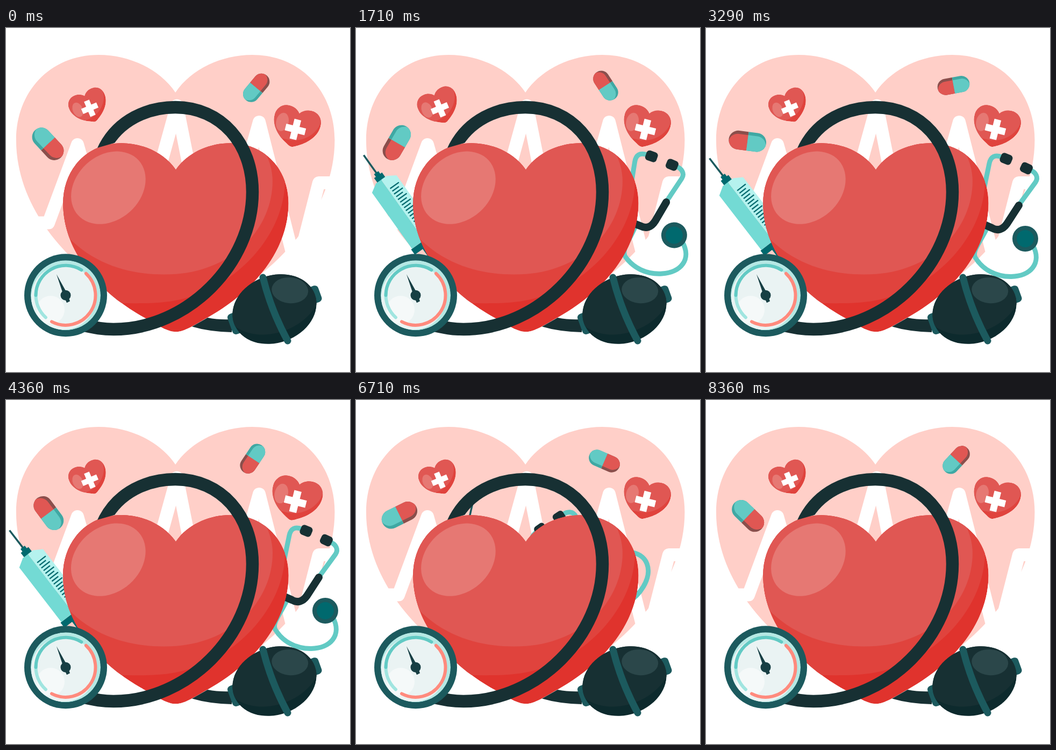
An HTML page that plays this animation: 640x640 px, repeating every 8430 ms.

```html
<!DOCTYPE html>
<html lang="en">
<head>
<meta charset="utf-8">
<title>Blood pressure</title>
<style>
  html, body { margin: 0; height: 100%; overflow: hidden; background: #fff; }
  svg { display: block; width: 100vw; height: 100vh; }
  .line { fill: none; stroke-linejoin: round; stroke-linecap: round; }
</style>
</head>
<body>
<svg viewBox="0 0 640 640">
  <defs>
    <path id="heart" d="M0-126C-21-157-61-175.5-101-175.5C-166-175.5-209.7-126-209.7-63.5C-209.7 30-136 105-66 145C-31 165-16 175.5 0 175.5C16 175.5 31 165 66 145C136 105 209.7 30 209.7-63.5C209.7-126 166-175.5 101-175.5C61-175.5 21-157 0-126Z"/>
    <path id="body" d="M-220 118C-150 120-80 125-30 121C100 112 203 0 203-105C203-135 190-158 175-185H-220Z"/>
    <clipPath id="inHeart"><use href="#heart"/></clipPath>
    <clipPath id="inPill"><rect x="-35" y="-17.5" width="70" height="35" rx="17.5"/></clipPath>
    <clipPath id="inBulb"><ellipse rx="80" ry="62.5"/></clipPath>
    <clipPath id="inDial"><circle r="65"/></clipPath>
    <clipPath id="hoseCut"><path d="M0 0H640V640H0V400H215V210L0 272Z"/></clipPath>

    <g id="smallHeart">
      <g clip-path="url(#inHeart)">
        <use href="#heart" fill="#e0433d"/>
        <use href="#body" fill="#e05753"/>
        <ellipse cx="-128" cy="-18" rx="55" ry="82" fill="#e67873"/>
      </g>
      <path d="M0-72V108M-90 18H90" stroke="#fff" stroke-width="61"/>
    </g>

    <g id="pill" clip-path="url(#inPill)">
      <path fill="#8a4f4c" d="M-40-20H0V20H-40Z"/>
      <path fill="#3fa8a3" d="M0-20H40V20H0Z"/>
      <g transform="translate(0 6)" clip-path="url(#inPill)">
        <path fill="#e05753" d="M-40-20H0V20H-40Z"/>
        <path fill="#62cac4" d="M0-20H40V20H0Z"/>
      </g>
    </g>
  </defs>

  <use href="#heart" transform="translate(315.2 298) scale(1.413)" fill="#ffcfc8"/>
  <path class="line" stroke="#fff" stroke-width="24" d="M30 362.500H79L133 217L182 390H250L318 144.500L367 390L405 410L471 175L540.500 450L582 288H640"/>

  <g id="syringe">
    <g transform="translate(6.500 242.500) rotate(52.300)">
      <path d="M0 0H50" stroke="#1c5a5e" stroke-width="3.500"/>
      <path fill="#00696e" d="M40-5H46V-9H58V9H46V5H40ZM194-30H206V-12H240V12H206V30H194Z"/>
      <path fill="#73dad4" d="M56 0V12L66 28H194V0Z"/>
      <path fill="#b5f2ee" d="M56 0V-12L66-28H194V0Z"/>
      <path d="M78-14H168" stroke="#00696e" stroke-width="20" stroke-dasharray="2.300 10.300"/>
      <path d="M84.300-12H168" stroke="#00696e" stroke-width="15" stroke-dasharray="2.300 10.300"/>
    </g>
  </g>

  <g id="scope">
    <g class="line" stroke="#62cac4" stroke-width="9">
      <path d="M550 240Q531 233 527 252L517 300L505 350"/>
      <path d="M602 264C614 268 619 278 613 287L583 328"/>
      <path d="M523 372C508 402 495 415 501 427C515 450 540 463 568 462.500C603 462 626 438 608 404"/>
    </g>
    <path class="line" stroke="#173033" stroke-width="14" d="M582 330L560 364Q548 381 532 372L505 360"/>
    <g fill="#173033">
      <rect x="-11" y="-9.500" width="22" height="19" rx="6" transform="translate(558.500 243.500) rotate(22)"/>
      <rect x="-11" y="-9.500" width="22" height="19" rx="6" transform="translate(596 261) rotate(25)"/>
    </g>
    <circle cx="594" cy="392" r="24" fill="#1c5a5e"/>
    <circle cx="594" cy="392" r="16" fill="#00696e"/>
  </g>

  <g id="main">
    <g clip-path="url(#inHeart)">
      <use href="#heart" fill="#e0332d"/>
      <use href="#body" fill="#e0433d"/>
      <path fill="#e05753" d="M-212-14C-150 62-60 72 0 68C110 60 180-20 180-105C180-130 170-160 150-180H-220Z"/>
      <ellipse rx="76" ry="60" transform="translate(-125.500 -92.500) rotate(-42)" fill="#e67873"/>
    </g>
  </g>

  <path class="line" clip-path="url(#hoseCut)" stroke="#173033" stroke-width="23.500" d="M172 246L184 221C210 172 262 147.500 315 147.500C400 147.500 458.500 215 458.500 305C458.500 438 338 560.500 200 560.500C180 560.500 165 558 140 552"/>
  <path fill="#173033" d="M346 555.500L375 539Q395 543 420 542V566Q378 565 346 555.500Z"/>

  <g transform="translate(111 497.300)">
    <circle r="77" fill="#1c5a5e"/>
    <g clip-path="url(#inDial)">
      <circle r="65" fill="#b5e8e4"/>
      <circle cx="-4" cy="4" r="60" fill="#eaf3f3"/>
      <circle cx="-28" cy="27" r="26" fill="#f5f9f9"/>
    </g>
    <g class="line" stroke-width="6">
      <path id="arcLow" stroke="#a0e5e0"/>
      <path id="arcTop" stroke="#62cac4"/>
      <path id="arcRed" stroke="#ff8a7d"/>
    </g>
    <path fill="#173f44" d="M-17-39L3-3L8 11L2 14L-4 0Z"/>
    <circle r="9.500" fill="#173f44"/>
  </g>

  <g transform="translate(499.500 523) rotate(-20)">
    <rect x="70" y="-16" width="20" height="32" rx="7" fill="#1c5a5e"/>
    <rect x="-88" y="-20" width="20" height="40" rx="7" fill="#1c5a5e"/>
    <g clip-path="url(#inBulb)">
      <ellipse rx="80" ry="64" fill="#0d2a2d"/>
      <ellipse cx="4" cy="-22" rx="92" ry="66" fill="#173033"/>
      <ellipse cx="39" cy="-23" rx="34" ry="24" transform="rotate(25 39 -23)" fill="#2b474a"/>
    </g>
  </g>
  <path class="line" stroke="#1c5a5e" stroke-width="13" d="M478 464Q493 525 524 582"/>

  <use id="leftHeart" href="#smallHeart"/>
  <use id="rightHeart" href="#smallHeart"/>
  <use id="leftPill" href="#pill"/>
  <use id="rightPill" href="#pill"/>
</svg>
<script>
const LOOP = 8430;
const $ = id => document.getElementById(id);
const move = (id, value) => $(id).setAttribute('transform', value);

// Circular arc of the dial, angles in degrees
function arc(id, from, to, r = 55.5) {
  const point = a => `${r * Math.cos(a * Math.PI / 180)} ${r * Math.sin(a * Math.PI / 180)}`;
  $(id).setAttribute('d', `M${point(from)}A${r} ${r} 0 ${to - from > 180 ? 1 : 0} 1 ${point(to)}`);
}
arc('arcLow', 132, 185);
arc('arcTop', 180, 302);
arc('arcRed', -47, 118);

// Scale of a heart that swells around each peak time
function beat(t, peaks, width) {
  let swell = 0;
  for (const p of peaks) {
    const x = Math.abs(t - p) / width;
    if (x < 0.5) swell += Math.cos(Math.PI * x) ** 2;
  }
  return 1 + 0.13 * swell;
}

function ease(t, start, length) {
  const x = Math.min(1, Math.max(0, (t - start) / length));
  return x < 0.5 ? 4 * x ** 3 : 1 - 4 * (1 - x) ** 3;
}

function draw(now) {
  const t = now % LOOP;
  const turn = 360 * t / LOOP;
  const tucked = 1 - ease(t, 900, 1000) + ease(t, 6170, 1000);

  const main = beat(t, [582, 2155, 3960, 5831, 7552], 843);
  const left = beat(t, [400, 1867, 3732, 5597, 7400], 600);
  const right = beat(t, [790, 2505, 4225, 5990, 7853], 600);

  move('main', `translate(315.9 389.7) scale(${main})`);
  move('leftHeart', `translate(154.7 146.5) rotate(-23) scale(${0.17 * left})`);
  move('rightHeart', `translate(539.3 185) rotate(14) scale(${0.21 * right})`);
  move('leftPill', `translate(78.5 213) rotate(${turn - 133}) translate(-1.6 -2.2)`);
  move('rightPill', `translate(462.3 110) rotate(${130 - turn}) translate(-1.2 -3.4) scale(.86)`);
  move('syringe', `rotate(${82 * tucked} 163 442)`);
  move('scope', `rotate(${-95 * tucked} 448 435)`);
  requestAnimationFrame(() => draw(performance.now()));
}
draw(performance.now());
</script>
</body>
</html>
```
